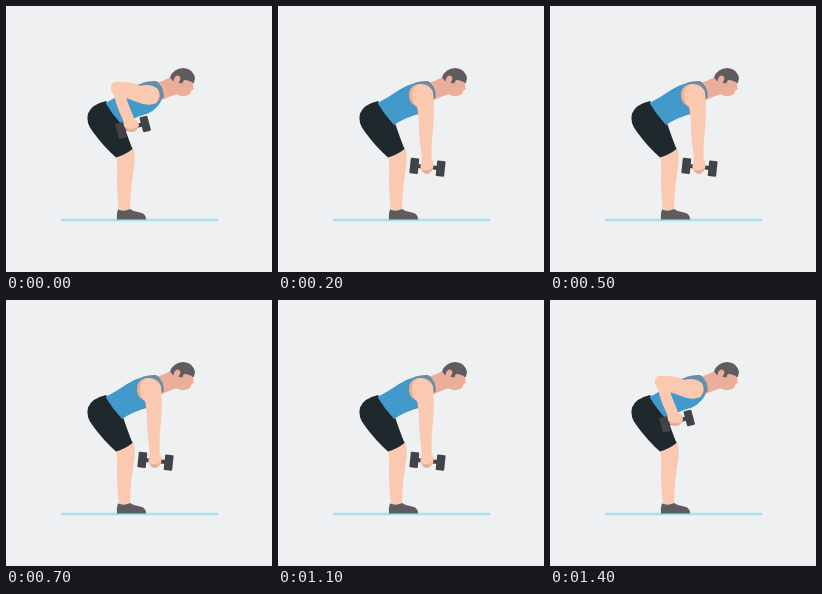
Animation of 266x266 px, one loop 1.5 s. Source, as an HTML page:

```html
<!DOCTYPE html>
<html lang="en">
<head>
<meta charset="utf-8">
<title>Dumbbell row</title>
<style>
  html, body { margin: 0; width: 100%; height: 100%; overflow: hidden; background: #eff0f2; }
  svg { display: block; width: 100%; height: 100%; }
  .skin { fill: #fbc8b0; }
  .shade { fill: #ebae9a; }
  .shirt { fill: #419aca; }
  .shorts { fill: #1f282d; }
  .grey { fill: #5f5c5f; }
  .iron { fill: #414347; }
  .trim { fill: none; stroke: #6b8da3; stroke-width: 1.8; stroke-linecap: round; }
</style>
</head>
<body>
<svg viewBox="0 0 266 266">
  <defs>
    <g id="dumbbell" class="iron">
      <rect x="-13" y="-2" width="26" height="4"/>
      <rect x="-17.500" y="-7.500" width="8.500" height="15.500" rx="1"/>
      <rect x="9" y="-7.500" width="8.500" height="15.500" rx="1"/>
    </g>
  </defs>

  <path d="M55 214H212" stroke="#a0e2ed" stroke-width="2.600"/>

  <g id="body">
    <path class="skin" d="M110 146L127 141Q130 151 128 162Q124 184 124 206H113Q111 190 111 174Q112 160 110 146Z"/>
    <path class="grey" d="M112 203.500Q118 206 124 203Q128 206 134 206.500Q140 207.500 140 213.500H111Q110 208 112 203.500Z"/>
    <path class="shorts" d="M100 95Q86 98 82 107.500Q79.500 117 87 126Q98 141 110 151.500Q119 149 126.500 143Q122 132 117 117Z"/>
    <path class="shade" d="M149 77Q158 75 165 71L176 87Q166 89 156 94Z"/>
    <path class="shade" d="M165 70Q175 63 186 71Q188 75 187 79L188 83L185.500 84Q185 89 179 90Q171 91 167 84Z"/>
    <path class="grey" d="M164 71.500Q167 62.500 177.500 62Q188 63 189 73L187.500 77.500Q184 74 178 74L176 77.500L167 75Z"/>
    <ellipse class="shade" cx="171" cy="73.500" rx="3" ry="4" transform="rotate(25 171 73.500)"/>
    <path class="shirt" d="M99.500 97Q111 91 121 84Q132 76 150 75.500Q157 81 157 91Q152 103 142 107.500Q126 112 116 119Q106 108 99.500 97Z"/>
    <path class="trim" d="M137 77.500Q144 75.500 150 76Q157 81 157 91"/>
  </g>

  <g id="raised">
    <path class="skin" d="M108 76Q122 75 133 79Q145 76 153 83Q156 91 151 97Q142 101 131 96Q121 92 110 90Q104 86 105 80Q106 77 108 76Z"/>
    <path class="trim" d="M134 79Q146 76 153 83Q157 91 151 97.500"/>
    <use href="#dumbbell" transform="translate(127 121) rotate(-15) scale(.95 1)"/>
    <path class="skin" d="M106 80Q112 76 117 83Q122 98 128 112Q135 117 132 122Q126 128 120 124Q118 119 117 114Q109 98 106 80Z"/>
    <path class="shade" d="M119 121Q125 125 132 121Q131 126 126 126Q121 127 119 121Z"/>
  </g>

  <g id="lowered">
    <path class="trim" d="M131 94Q129 84 137 79Q148 75 154 82"/>
    <use href="#dumbbell" transform="translate(149.500 161) rotate(6)"/>
    <path class="shade" d="M131 91Q130 81 139 78L147 82L139 101Q132 98 131 91Z"/>
    <path class="skin" d="M134 91Q133 81 141 78Q151 77 155 86Q156.500 102 155.500 117Q153 135 153.500 153Q157 158 154.500 164Q150 170 144 166Q141 161 144 154Q142 139 141 125Q141 110 139 101Q135 98 134 91Z"/>
    <path class="shade" d="M144 163Q149 166 155 162Q153 168 148 168Q145 167 144 163Z"/>
  </g>
</svg>
<script>
  const LOOP = 1500, DROP = 200, LIFT = 1200;
  const raised = document.getElementById("raised");
  const lowered = document.getElementById("lowered");

  function draw() {
    const t = performance.now() % LOOP;
    const down = t >= DROP && t < LIFT;
    raised.style.display = down ? "none" : "";
    lowered.style.display = down ? "" : "none";
    requestAnimationFrame(draw);
  }
  draw();
</script>
</body>
</html>
```
